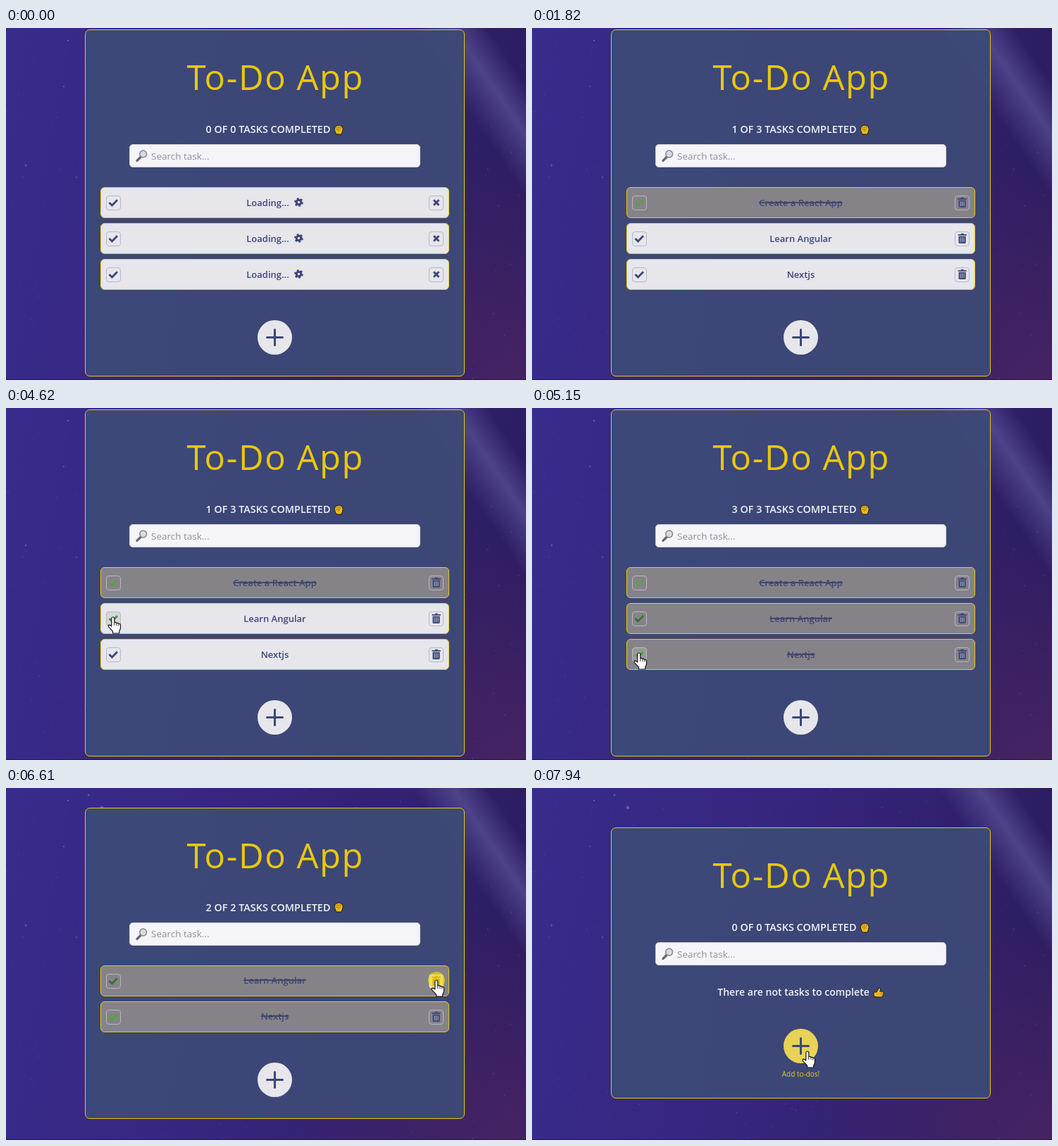
An HTML page with a canvas that plays this animation: 738x500 px, repeating every 8000 ms.

```html
<!DOCTYPE html>
<html lang="en">
<head>
<meta charset="utf-8">
<title>To-Do App</title>
<style>
  :root { --gold: #e9c80c; --navy: #3d4678; --light: #e6e6eb; --green: #45ac32; }
  * { box-sizing: border-box; margin: 0; }
  html, body { width: 100%; height: 100%; overflow: hidden; }
  body { position: relative; background: #33247a; font-family: "Open Sans", "Noto Sans", sans-serif; }
  svg { display: block; overflow: visible; flex: none; }
  [hidden] { display: none !important; }

  .sky { position: absolute; left: 0; top: 0; }
  .stage { position: absolute; left: 112px; top: 0; width: 539px; height: 497px; display: flex; align-items: center; }
  .card {
    width: 539px; padding-bottom: 30px; display: flex; flex-direction: column; align-items: center;
    border: 1px solid var(--gold); border-radius: 7px; background: rgba(61, 73, 119, .96);
  }
  h1 { margin-top: 36px; font-size: 49px; font-weight: 400; line-height: 60px; letter-spacing: 1.5px; text-indent: 1.5px; color: var(--gold); white-space: nowrap; }
  .line { display: flex; justify-content: center; align-items: center; height: 20px; gap: 5px; color: #f1f1f5; font-weight: 600; line-height: 20px; white-space: nowrap; }
  .count { margin-top: 35px; font-size: 14.4px; }
  .search {
    display: flex; align-items: center; gap: 5px; width: 413px; height: 33px; margin-top: 11px; padding-left: 8px;
    border: 1px solid #cfcfd8; border-radius: 5px; background: #f4f4f9; color: #8f8f9a; font-size: 13.5px;
  }
  .list { width: 495px; margin-top: 28px; }
  .row {
    position: relative; display: flex; justify-content: center; align-items: center; gap: 7px;
    height: 44px; margin-bottom: 7px; padding-bottom: 1px;
    border: 1px solid var(--gold); border-radius: 6px; background: var(--light);
    color: var(--navy); font-size: 13px; font-weight: 600; white-space: nowrap;
  }
  .box { position: absolute; top: 11px; width: 21px; height: 21px; border: 1px solid #b7b8c6; border-radius: 4px; }
  .box svg { position: absolute; left: -1px; top: -1px; }
  .check { left: 7px; color: var(--navy); stroke-width: 2.8; }
  .delete { right: 7px; }
  .done { background: #868388; }
  .done .name { text-decoration: line-through 2px #45476a; }
  .done .check { color: var(--green); stroke-width: 2; }
  .done:nth-child(2) .check { color: #34702f; stroke-width: 2.6; }
  .done:nth-child(3) .check { stroke-width: 3; }
  .row.last .check { color: #ecd01c; stroke-width: 2.4; }
  .check.hover { background: #d6d6db; color: #478f4a; }
  .done .check.hover { background: #9a979b; color: var(--green); }
  .delete.hover { background: #efeff3; color: #e0501c; }
  .empty { height: 26px; padding-bottom: 6px; font-size: 14.1px; }
  .add { width: 49px; height: 49px; margin-top: 36px; border-radius: 50%; background: var(--light); color: var(--navy); }
  .add.hover { background: #e8d258; }
  .tip { height: 19px; padding-top: 8px; font-size: 10px; line-height: 14px; color: var(--gold); white-space: nowrap; }

  .gear { animation: spin 2s linear infinite; }
  @keyframes spin { to { transform: rotate(360deg); } }

  .cursor { position: absolute; left: 0; top: 0; animation: path 8s linear infinite; }
  .cursor svg { position: absolute; left: -8px; top: -1px; }
  .ring { position: absolute; left: -12px; top: -12px; width: 24px; height: 24px; border-radius: 50%; background: rgba(236, 214, 8, .68); animation: click 8s step-end infinite; }
  @keyframes path {
    0%, 26.85% { opacity: 0; transform: translate(162px, 386px); }
    26.86% { opacity: 1; transform: translate(162px, 386px); }
    30% { transform: translate(158px, 290px); }
    32% { transform: translate(153px, 224px); }
    33.5%, 37.7% { transform: translate(150px, 246px); }
    37.75%, 52% { transform: translate(148px, 247px); }
    56.8%, 59.4% { transform: translate(152px, 297px); }
    60.3% { transform: translate(152px, 325px); }
    61.9%, 64.5% { transform: translate(152px, 348px); }
    67% { transform: translate(290px, 337px); }
    69.4% { transform: translate(480px, 300px); }
    70.8% { transform: translate(570px, 249px); }
    72.2%, 76.5% { transform: translate(612px, 240px); }
    80.5%, 84% { transform: translate(611px, 273px); }
    86.7%, 93.4% { transform: translate(610px, 299px); }
    96% { opacity: 1; transform: translate(500px, 336px); }
    98.9%, 100% { opacity: 1; transform: translate(391px, 374px); }
  }
  @keyframes click {
    0%, 43.55%, 51.3%, 59.35%, 64.1%, 75.2%, 83.5%, 92.7% { opacity: 0; }
    42.875%, 50.375%, 58.5%, 63.2%, 73.5%, 82.6%, 91.7% { opacity: 1; }
  }
</style>
</head>
<body>
<svg width="0" height="0" style="position:absolute">
  <symbol id="tick" viewBox="0 0 21 21"><path d="M4.5 10l4 4L16 6.2" fill="none" stroke="currentColor"/></symbol>
  <symbol id="cross" viewBox="0 0 21 21"><path d="M7 6.2l7.4 7.6M14.4 6.2L7 13.8" stroke="currentColor" stroke-width="2.9"/></symbol>
  <symbol id="bin" viewBox="0 0 21 21">
    <path d="M4.5 4h4l.8-1.2h3L13 4h3.8v1.7H4.5zM5.5 6.8h10.2V15.4q0 1.6-1.6 1.6H7.1q-1.6 0-1.6-1.6z" fill="currentColor"/>
    <path d="M8.2 8.4v6.8M10.6 8.4v6.8M13 8.4v6.8" stroke="#c9c9d2" stroke-width=".9"/>
  </symbol>
  <symbol id="gear" viewBox="0 0 13 13">
    <g fill="none" stroke="currentColor">
      <circle cx="6.5" cy="6.5" r="3.3" stroke-width="3"/>
      <circle cx="6.5" cy="6.5" r="5.2" stroke-width="2.4" pathLength="12" stroke-dasharray="1"/>
    </g>
  </symbol>
</svg>

<canvas class="sky" width="738" height="500"></canvas>

<div class="stage">
  <main class="card">
    <h1>To-Do App</h1>
    <p class="line count"><span id="count"></span>
      <svg width="14" height="15" fill="#e9b91d" stroke="#1e1a1c">
        <path d="M2.5 3Q7-.8 11.5 2.5 14.5 6 12.4 10.4L11 14H4L2.6 11.2Q-.4 7 2.5 3z"/>
        <path d="M4.8 2.6v3.6M7.2 2v4M9.6 2.4v3.8M3 7.4h5.4L6 10" fill="none" stroke="#9a6a12" stroke-width=".8"/>
      </svg>
    </p>
    <div class="search">
      <svg width="17" height="17" fill="none">
        <path d="M7 10.5L2 15.4" stroke="#6b6668" stroke-width="3.4" stroke-linecap="round"/>
        <circle cx="10.7" cy="6" r="4.9" fill="#d5dbe2" stroke="#85858c" stroke-width="1.5"/>
      </svg>
      Search task...
    </div>
    <div class="list" id="list"></div>
    <p class="line empty" id="empty" hidden>There are not tasks to complete
      <svg width="16" height="15" fill="#efb920" stroke="#1e1a1c">
        <path d="M1 7h4L8.4 1q2.6-.4 2.2 2.4L9.8 6H14q1.6 1 .8 2.6.4 1.4-.5 2.2 0 1.300-.9 1.800-.2 1.400-1.800 1.400H5.500L1 13z"/>
        <path d="M10.500 8.500h4M10.500 11h3.600" stroke="#9a6a12" stroke-width=".8"/>
      </svg>
    </p>
    <div class="add" id="add">
      <svg width="49" height="49"><path d="M13.500 24.500h22M24.500 13.500v22" stroke="currentColor" stroke-width="3" stroke-linecap="round"/></svg>
    </div>
    <p class="tip" id="tip" hidden>Add to-dos!</p>
  </main>
</div>

<div class="cursor">
  <div class="ring"></div>
  <svg width="20" height="25" stroke="#16161c" stroke-width="1.200" stroke-linejoin="round">
    <path fill="#fff" d="M5.800 14V3a2 2 0 0 1 4 0v5.800q1.800-1 3.200.7 1.700-.7 2.800.8 2.600-.3 2.700 2.400v4.300l-1.800 4.200V24H7.600v-2.600L1.400 14.600q-1-2.300 1.200-2.500 1.700.1 3.200 1.900z"/>
    <path fill="none" stroke-width=".9" d="M9.800 9v4M13 9.800v3.400M15.800 10.800v2.800"/>
  </svg>
</div>

<script>
const LOOP = 8000, LOADED = 1750;
const tasks = [
  { name: "Create a React App", done: [[LOADED, 3430], [4100, LOOP]], gone: 6020, check: [2600, 4250], bin: [5760, 6020] },
  { name: "Learn Angular", done: [[4750, LOOP]], gone: 6680, check: [4480, 4800], bin: [6310, 6680] },
  { name: "Nextjs", done: [[5110, LOOP]], gone: 7420, check: [4920, 5180], bin: [6840, 7420] },
];
const addHover = [7870, LOOP];

const $ = id => document.getElementById(id);
const within = (t, [from, to]) => t >= from && t < to;
const icon = (id, size, cls = "") => `<svg class="${cls}" width="${size}" height="${size}"><use href="#${id}"/></svg>`;

for (const task of tasks) {
  const row = document.createElement("div");
  row.className = "row";
  row.innerHTML = `<div class="box check">${icon("tick", 21)}</div><span class="name"></span>
    ${icon("gear", 13, "gear")}<div class="box delete">${icon("cross", 21, "cross")}${icon("bin", 21, "bin")}</div>`;
  $("list").append(row);
  const find = sel => row.querySelector(sel);
  task.el = { row, check: find(".check"), name: find(".name"), gear: find(".gear"), del: find(".delete"), cross: find(".cross"), bin: find(".bin") };
}

function show(el, on) { el.toggleAttribute("hidden", !on); }
function setText(el, text) { if (el.textContent !== text) el.textContent = text; }

function render(t) {
  const loaded = t >= LOADED;
  let total = 0, completed = 0;
  for (const { el, ...task } of tasks) {
    const alive = t < task.gone;
    const done = task.done.some(span => within(t, span));
    if (loaded && alive) { total++; completed += done; }
    show(el.row, alive);
    show(el.gear, !loaded);
    show(el.cross, !loaded);
    show(el.bin, loaded);
    setText(el.name, loaded ? task.name : "Loading...");
    el.row.classList.toggle("done", done);
    el.row.classList.toggle("last", loaded && t >= tasks[1].gone);
    el.check.classList.toggle("hover", within(t, task.check));
    el.del.classList.toggle("hover", within(t, task.bin));
  }
  const hovered = within(t, addHover);
  setText($("count"), `${completed} OF ${total} TASKS COMPLETED`);
  show($("empty"), loaded && !total);
  show($("tip"), hovered);
  $("add").classList.toggle("hover", hovered);
}

function paintSky() {
  const c = document.querySelector(".sky").getContext("2d");
  const fill = (gradient, stops) => {
    stops.forEach(([at, color]) => gradient.addColorStop(at, color));
    c.fillStyle = gradient;
    c.fillRect(0, 0, 738, 500);
  };
  fill(c.createLinearGradient(0, 60, 738, 180), [[0, "#382b8b"], [.5, "#36257c"], [1, "#2c1d61"]]);
  fill(c.createRadialGradient(720, 500, 0, 720, 500, 330), [[0, "rgba(80,38,100,.7)"], [1, "rgba(80,38,100,0)"]]);

  // Soft light streak
  c.save();
  c.translate(690, 95);
  c.rotate(Math.atan2(235, 160));
  const glow = c.createLinearGradient(0, -48, 0, 42);
  [[0, "rgba(98,90,160,0)"], [.45, "rgba(98,90,160,.6)"], [1, "rgba(98,90,160,0)"]].forEach(s => glow.addColorStop(...s));
  c.fillStyle = glow;
  c.fillRect(-300, -48, 600, 90);
  c.restore();

  let seed = 17;
  const random = () => (seed = seed * 16807 % 2147483647) / 2147483647;
  const dot = (x, y, r, alpha) => {
    c.fillStyle = `rgba(150,135,205,${alpha})`;
    c.beginPath();
    c.arc(x, y, r, 0, 7);
    c.fill();
  };
  for (let i = 0; i < 420; i++) dot(random() * 738, random() * 500, .5 + random() * .8, .04 + random() * .14);
  [[136, 28, 2.4], [117, 10, 1.3], [88, 18, 1.2], [28, 195, 1.2], [82, 83, 1], [100, 212, 1]].forEach(([x, y, r]) => dot(x, y, r, .5));
  c.fillStyle = "rgba(20,14,50,.45)";
  c.fillRect(0, 499, 738, 1);
}

paintSky();
render(0);
let start;
requestAnimationFrame(function tick(now) {
  start ??= now;
  render((now - start) % LOOP);
  requestAnimationFrame(tick);
});
</script>
</body>
</html>
```
